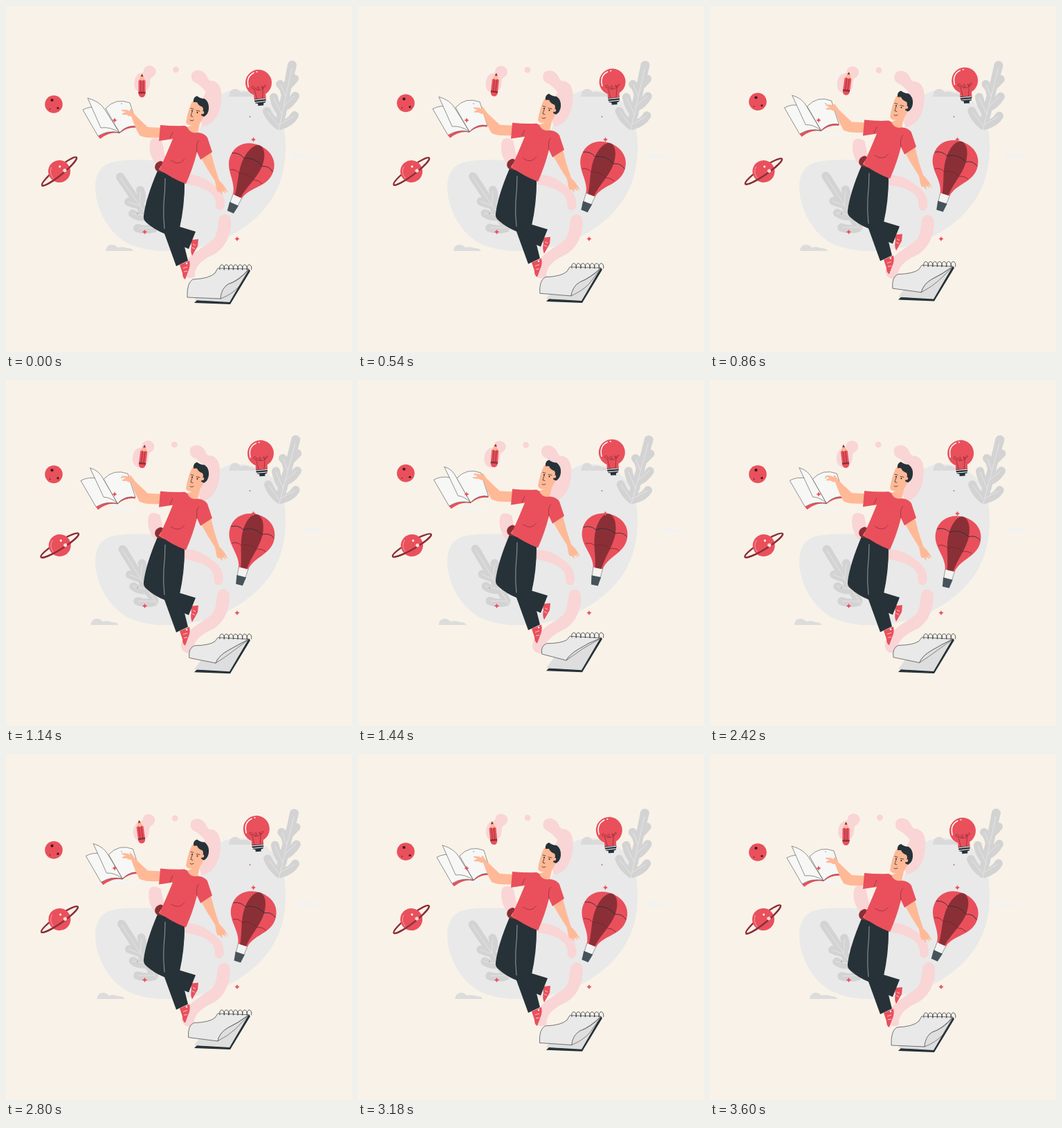
Animation of 500 by 500 pixels, one loop 3660 ms. Source, as an HTML page:

```html
<!DOCTYPE html>
<html lang="en">
<head>
<meta charset="utf-8">
<title>Floating ideas</title>
<style>
html, body { margin: 0; height: 100%; overflow: hidden; background: #f9f2e8; }
svg { display: block; width: 100vw; height: 100vh; }
.red { fill: #e9505c; }
.maroon { fill: #8b2f36; }
.dark { fill: #263238; }
.skin { fill: #ffb997; }
.pink { fill: #f9d5d5; }
.paper { fill: #f7f7f6; stroke: #4a4a4a; stroke-width: .6; }
.line { fill: none; stroke: #263238; stroke-width: .8; stroke-linecap: round; }
.leaf { fill: none; stroke: #d3d3d3; stroke-width: 12; stroke-linecap: round; stroke-linejoin: round; }
.vein { fill: none; stroke: #e9e9e9; stroke-width: .8; }
</style>
</head>
<body>
<svg viewBox="0 0 500 500">
<defs>
  <path id="cloud" d="M0 0Q1-9 9-9Q14-9 17-5Q25-7 31-4Q39-4 40 0Z"/>
  <path id="star" class="red" d="M0-3.6Q.6-.6 3.6 0Q.6.6 0 3.6Q-.6.6-3.6 0Q-.6-.6 0-3.6Z"/>
</defs>

<path fill="#e9e9e9" d="M145 229C165 219 205 224 238 223C268 220 276 185 289 155C297 135 311 122 334 122C366 120 390 140 399 166C408 196 406 242 387 274C369 306 331 334 292 345C256 357 208 358 178 344C148 329 129 292 129 262C129 246 135 234 145 229Z"/>
<use href="#cloud" transform="translate(322 131) scale(1 1.25)" fill="#dadada"/>
<g id="cloudL"><use href="#cloud" x="144" y="354" fill="#dcdcdc"/></g>
<g id="cloudR"><use href="#cloud" transform="translate(411 220) scale(.86 .9)" fill="#f2f2f1"/></g>
<g id="cloudB"><use href="#cloud" transform="translate(162 188) scale(.95 .8)" fill="#f4f4f3"/></g>

<g id="leafR">
  <path class="leaf" d="M394 172L414 85M408 112L413 85M404 130Q402 118 396 113M407 116L417 105M402 146Q411 142 418 130M399 156Q389 144 387 132M396 173Q412 168 417 158M394 173Q382 164 377 152M395 170L400 150L405 125"/>
  <path class="vein" d="M394 179L413 90M404 130L397 114M401 145L417 130M399 157L387 133M396 171L416 159M394 173L378 153"/>
</g>
<g id="leafL">
  <path class="leaf" d="M214 319L165 247M182 272L166 248M193 288Q184 286 177 283M194 284Q198 275 194 266M203 304Q192 306 183 300M205 298Q210 290 208 282M214 321Q202 325 190 321M190 283L212 316"/>
  <path class="vein" d="M221 328L165 248M193 289L176 283M193 288L194 268M203 303L182 300M205 304L208 284M214 320L191 321"/>
</g>

<g id="pink" class="pink">
  <circle cx="245.5" cy="92" r="4.4"/>
  <path d="M199 94C199 87 207 84 213 88C219 92 217 100 211 103C207 105 209 111 207 117C204 125 192 128 187 120C183 112 186 100 193 97Q198 97 199 94Z"/>
  <path d="M268 100C269 93 279 90 286 96C291 100 291 106 295 108C307 107 313 120 311 135C310 154 301 172 284 174L276 150L289 124Q280 113 272 110Q267 106 268 100Z"/>
  <path d="M225 194Q211 186 208 197Q205 216 219 231L232 227Z"/>
  <path d="M254 243Q281 242 299 258Q316 268 316 287C315 298 302 297 303 286C304 268 281 260 252 256Z"/>
  <path d="M309 305C314 298 325 300 325 311C326 330 317 349 302 358C283 367 272 376 273 391C266 396 255 392 255 382C258 364 279 352 294 342C310 332 304 314 309 305Z"/>
</g>

<g id="moon">
  <circle class="red" cx="69" cy="142" r="12.8"/>
  <g fill="#3a1a20"><circle cx="66.5" cy="136" r="2.1"/><circle cx="75" cy="147.5" r="1.6"/><circle cx="63.5" cy="149" r=".8"/></g>
</g>

<g id="planet">
  <ellipse rx="32" ry="5.5" fill="none" stroke="#8b2f36" stroke-width="2.4"/>
  <circle class="red" r="16"/>
  <path fill="none" stroke="#f3a3a8" stroke-width=".9" d="M-13 3Q-14-7-5-12"/>
  <path fill="none" stroke="#8b2f36" stroke-width="2.4" d="M-32 0A32 5.5 0 0 0 32 0"/>
  <circle cx="5" cy="-5" r="1.5" fill="#fff"/><circle cx="7" cy="4" r="2.6" fill="#fbd9d9"/>
</g>

<g id="pencil">
  <path class="skin" d="M-5-7L0-17L5-7Z"/>
  <path class="maroon" d="M-2-13L0-17L2-13Z"/>
  <path class="red" d="M-5-7L-2.5-8.5L0-7L2.5-8.5L5-7V12Q4 17 0 17Q-4 17-5 12Z"/>
  <path fill="none" stroke="#8b2f36" stroke-width=".8" d="M-1.7-7V9M1.7-7V9"/>
  <path class="maroon" d="M-5 9H5V11.5H-5Z"/>
</g>

<g id="bulb">
  <path class="red" d="M-8 17V26H9V16Z"/>
  <circle class="red" r="19"/>
  <path fill="none" stroke="#8b2f36" stroke-width=".8" d="M-4 23L-7 8C-14 8-9 0-5 8C-4 12 1 11 0 7C-1 3-5 8-1 10C4 12 6 8 5 6C4 3 2 8 6 8C13 6 9 0 6 8L4 23"/>
  <path fill="none" stroke="#fff" stroke-width="1.5" stroke-linecap="round" d="M-15 5Q-18-10-6-15M-2-16H-1"/>
  <path class="dark" d="M-8 23H9L8 29L5 30V33H-3V30L-7 29Z"/>
  <path stroke="#fff" stroke-width="1" d="M-9 24.5L9 23.8M-8 28L8 27.2"/>
</g>

<g id="balloon">
  <path fill="#f3f3f2" stroke="#555" stroke-width=".5" d="M-7 47L-6 62H6L7 47Z"/>
  <path fill="#46535b" d="M-7 60H7L5 73H-5Z"/>
  <path class="red" d="M-7 48C-11 28-33 20-33-2C-33-21-18-32 0-32C18-32 33-21 33-2C33 20 11 28 7 48Z"/>
  <path class="maroon" d="M-4 48C-7 28-15 14-14-6C-13-19-9-29-2-32H2C10-29 14-19 15-6C15 14 7 28 5 48Z"/>
  <path class="line" d="M-32-6Q-23-11-14-6Q0-14 15-6Q24-11 32-5"/>
  <path fill="none" stroke="#6f252d" stroke-width=".7" d="M-25 17Q-18 13-11 17Q0 11 12 17Q18 14 25 17"/>
</g>

<g id="book">
  <path class="red" d="M133 188L136 192Q150 181 164 184Q176 174 190 176L189 172L160 176Z"/>
  <path class="paper" d="M111 150Q122 144 135 147L164 183Q147 179 133 188Z"/>
  <path class="paper" d="M144 148Q159 132 179 140L190 174Q175 171 164 183Z"/>
  <path class="paper" id="page"/>
</g>

<g id="man">
  <path class="red" d="M267 338L278 337L277 347L269 361Q266 355 268 347Z"/>
  <path class="red" d="M251 374L265 368Q267 376 263 384L259 395Q255 393 255 386Z"/>
  <path fill="none" stroke="#fff" stroke-width=".7" d="M256 379L262 377M257 384L262 383M270 344L274 346M269 349L273 351"/>
  <circle cx="261" cy="372" r="1.2" fill="#fff"/>
  <path class="dark" d="M219 238Q202 278 199 303Q198 309 203 313Q214 323 229 329Q245 344 264 351L274 326L251 319Q257 289 258 256L232 238Z"/>
  <path class="dark" d="M231 241L258 256Q258 290 251 320L263 368L246 376L229 329Q227 280 231 241Z"/>
  <path fill="none" stroke="#c4c9cb" stroke-width=".7" d="M230 249Q230 265 228 285Q227 305 229 322"/>
  <path class="maroon" d="M224 224C215 225 212 235 219 239L233 242L236 230Z"/>
  <path class="skin" d="M224 231L234 235L229 241L221 236Z"/>
  <path class="skin" d="M224 176L205 175Q195 166 186 157L181 150Q178 147 179 152Q174 149 167 150Q166 152 173 153L167 156Q169 158 174 157Q178 160 181 159Q186 175 193 187Q203 192 224 190Z"/>
  <path class="skin" d="M282 220L296 211Q301 232 308 252Q316 259 321 270L315 265L318 271L312 267L313 273L308 268Q306 271 304 264L302 253Q292 238 282 220Z"/>
  <path class="red" d="M223 172Q242 174 258 173L278 183Q287 184 291 190L298 211L281 222L276 211Q270 235 260 257Q239 249 222 236Q232 214 241 192L221 195Z"/>
  <path fill="none" stroke="#8b2f36" stroke-width=".7" d="M276 211Q274 198 279 194M238 223Q250 232 258 221M237 191L241 182"/>
  <path class="skin" d="M269 138Q263 150 260 168Q262 173 269 172L262 175Q266 185 277 183L280 170L286 159L290 144L277 136Z"/>
  <path class="dark" d="M271 139Q270 132 276 130Q281 134 287 134Q294 139 293 149Q292 157 286 160L282 158L284 152Q286 150 284 146Q278 144 276 139Z"/>
  <circle class="skin" cx="284" cy="154" r="2.3"/>
  <path class="line" d="M267 148L271 149M275 151L280 152M269 153L267 159L270 160M266 165Q268 167 271 165"/>
  <circle cx="269" cy="151.5" r=".9"/><circle cx="276.5" cy="154" r=".9"/>
</g>

<g id="notebook">
  <path class="dark" d="M272 429L276 425L323 427L351 380L353 383L324 431Z"/>
  <path fill="#dedede" d="M306 379L351 380L323 428L272 425Z"/>
  <path id="sheet" fill="#e9e9e9" stroke="#555" stroke-width=".8"/>
  <path id="curl" fill="#dfdfdf" stroke="#555" stroke-width=".7"/>
  <path id="rings" class="line"/>
</g>

<use href="#star" x="357.5" y="193"/>
<use href="#star" x="334" y="336.5"/>
<use href="#star" x="200.5" y="326.5"/>
<use href="#star" x="157" y="165"/>
<circle class="red" cx="352.5" cy="160" r=".9"/>
<circle class="dark" cx="190" cy="300" r=".6"/>
<circle class="dark" cx="167" cy="141" r=".6"/>
</svg>

<script>
const LOOP = 3660, SWING = 3600;
const el = id => document.getElementById(id);
const move = (id, x, y, turn = 0, cx = 0, cy = 0) =>
  el(id).setAttribute('transform', `translate(${x} ${y}) rotate(${turn} ${cx} ${cy})`);

// Blend two paths that share the same commands.
const morph = (id, from, to, p) => {
  const ends = to.match(/-?[\d.]+/g);
  let i = 0;
  el(id).setAttribute('d', from.replace(/-?[\d.]+/g, n => +n + (ends[i++] - n) * p));
};

let rings = '';
for (let x = 309; x < 350; x += 6.6) rings += `M${x} 381C${x - 2} 371 ${x + 8} 372 ${x + 6} 381`;
el('rings').setAttribute('d', rings);

function draw(now) {
  const angle = Math.min(now % LOOP, SWING) / SWING * 2 * Math.PI;
  const p = (1 - Math.cos(angle)) / 2, s = Math.sin(angle);

  move('cloudL', -30.5 * p, 0);
  move('cloudR', 28.5 * p, 0);
  move('cloudB', -14 * p, 0);
  move('leafR', p, 0, 4 * p, 396, 178);
  move('leafL', 0, 0, 3.5 * p, 221, 327);
  move('pink', -3.2 * p, 2 * p);
  move('moon', 0, -8 * p);
  move('planet', 77 + p, 239, -39 + 10 * p);
  move('pencil', 196.5 + 2 * s, 115 - 6.5 * p, 8 * s);
  move('bulb', 365 + 3.2 * s, 111 - 7 * p, -4 + 2 * p);
  move('balloon', 354 + 3.5 * p - 1.7 * s, 231 - 5.5 * p - 2 * s, 24 - 14 * p);
  move('book', -4 * s + p, -6.5 * p);
  move('man', 0, -16 * p);
  move('notebook', 0, -9.7 * p);

  morph('page', 'M118 133Q136 138 143 150L164 183Q151 174 137 176Z',
    'M127 131Q138 134 144 147L164 183Q156 174 147 173Z', p);
  morph('sheet', 'M306 379L351 380Q336 397 321 402Q312 407 310 423L262 421Q261 400 270 395Q294 394 302 386Z',
    'M306 379L351 382Q333 387 319 397Q305 405 300 413L266 403Q264 392 273 389Q293 389 302 384Z', p);
  morph('curl', 'M351 381Q336 398 321 402Q311 408 310 423Q326 417 336 406Z',
    'M351 382Q333 387 319 397Q305 405 300 413Q312 404 324 396Z', p);
  requestAnimationFrame(draw);
}
requestAnimationFrame(draw);
</script>
</body>
</html>
```
